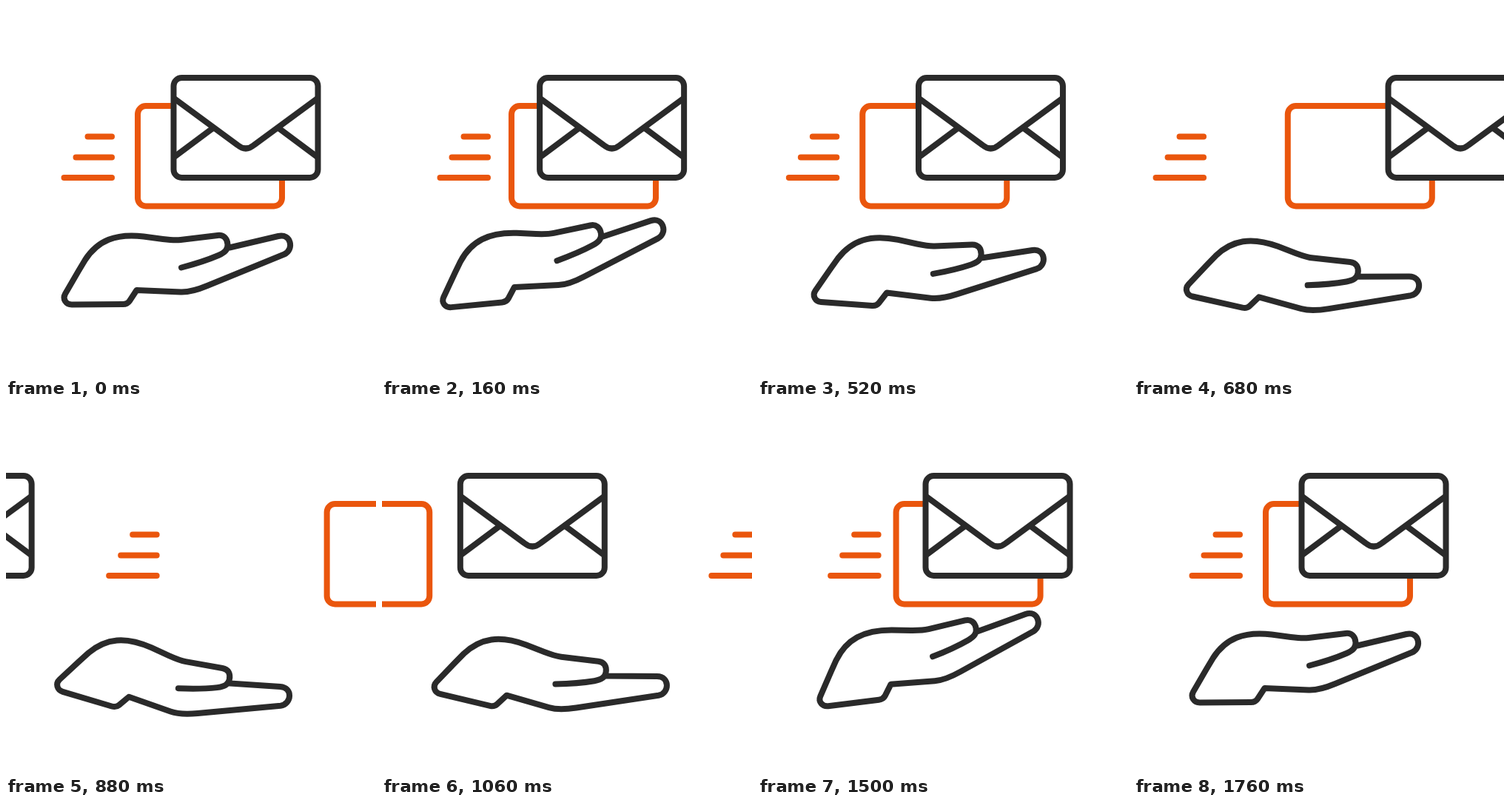
These frames come from a looping animation (500x500 px, 2 s). An HTML page:

```html
<!DOCTYPE html>
<html lang="en">
<head>
<meta charset="utf-8">
<title>Mail delivery</title>
<style>
html, body { margin: 0; width: 100%; height: 100%; overflow: hidden; background: #fff; }
svg { display: block; width: 100%; height: 100%; stroke-width: 8; stroke-linecap: round; stroke-linejoin: round; fill: #fff; }
.orange { stroke: #ea560d; }
.dark { stroke: #2a2a2a; }
.open { fill: none; }
</style>
</head>
<body>
<svg viewBox="0 0 500 500">
  <path id="lines" class="orange" d="M110.5 176.5H143M94.5 204.5H143M78.5 232H143"/>
  <rect id="card" class="orange" x="178" y="135" width="195" height="135.5" rx="11"/>
  <g id="mail" class="dark">
    <rect x="226.5" y="97" width="195" height="135" rx="11"/>
    <path class="open" d="M228 125.500L313 188Q324 197 335 188L420 125.500M228 203.500L279 165.500M420 203.500L369 165.500"/>
  </g>
  <path id="hand" class="dark open" d="M237 353.500C258 348 273 343 287 337C296 333 300 329 299.500 322
    C299 314 294 309 286 310L236 316C228 317 220 316 212 315L186 311.500
    C148 307 124 317 107 343L98 358L80 389C76 396 81 403.500 89 403.500L158 403
    Q164 403 167 398.500L176.500 384L236 386.500C249 387 260 383 272 378L376 335.500
    C390 329 385 307 368 311L302 326.500"/>
</svg>
<script>
const LOOP = 2000, STEP = 20;
const smooth = u => u * u * (3 - 2 * u);
const accel = u => u * u;
const el = id => document.getElementById(id);

// Keys: [time, value, easing towards it]; a repeated time is a jump.
const tracks = {
  mail: [[0, 0], [400, -38], [801, 280, accel], [801, -430], [1214, 20.5], [1480, 0]],
  card: [[90, 0], [495, -38], [926, 330, accel], [926, -380], [1418, 11], [1690, 0]],
  lines: [[170, 0], [690, -49], [1090, 437, accel], [1200, 437], [1200, -170], [1490, 19.7], [1760, 0]],
  hand: [[0, 0], [225, -6.4], [840, 17], [960, 17], [1400, -8.2], [1760, 0]]
};

function valueAt(keys, t) {
  const i = keys.findIndex(k => k[0] > t);
  if (i < 0) return keys[keys.length - 1][1];
  if (i === 0) return keys[0][1];
  const [t0, a] = keys[i - 1], [t1, b, ease = smooth] = keys[i];
  return a + (b - a) * ease((t - t0) / (t1 - t0));
}

function draw(now) {
  const t = Math.floor((now - start) % LOOP / STEP) * STEP;
  for (const id of ["mail", "card", "lines"])
    el(id).setAttribute("transform", `translate(${valueAt(tracks[id], t)} 0)`);
  el("hand").setAttribute("transform", `rotate(${valueAt(tracks.hand, t)} 132 355)`);
}

const start = performance.now();
function tick() {
  draw(performance.now());
  requestAnimationFrame(tick);
}
tick();
</script>
</body>
</html>
```
